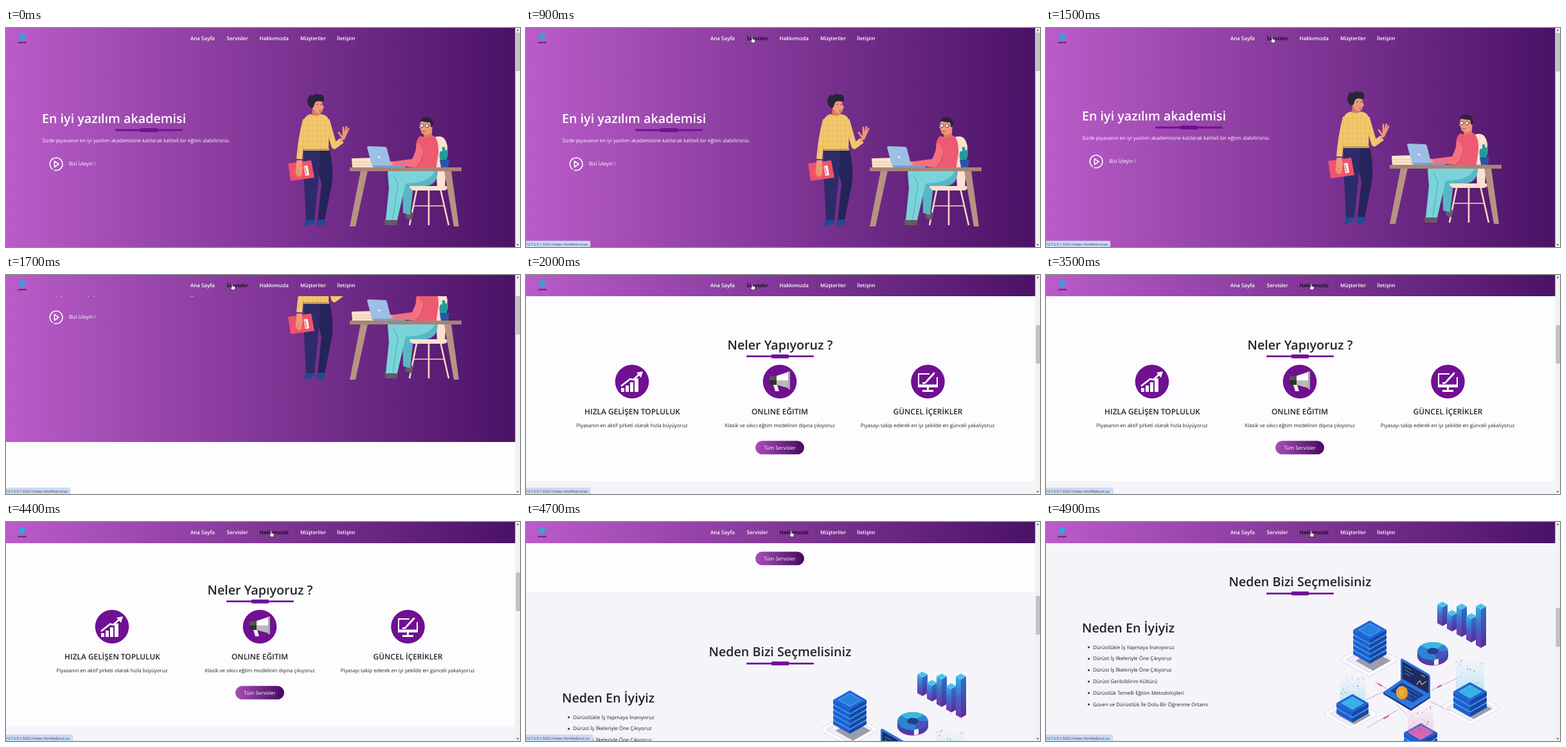
Recreate the animation shown at these times as an HTML page. Size 800x341 px, loop 5300 ms.

```html
<!DOCTYPE html>
<html lang="tr">
<head>
<meta charset="utf-8">
<title>Yazılım akademisi</title>
<style>
html, body { margin: 0; width: 100%; height: 100%; overflow: hidden; background: #fdfcff; }
svg { display: block; width: 800px; height: 341px; }
text { font: 400 7.88px "Open Sans", "Noto Sans", sans-serif; fill: #212529; text-rendering: geometricPrecision; }
.h1 { font-size: 19.7px; font-weight: 600; }
.h4 { font-size: 11.9px; font-weight: 600; }
.mid { text-anchor: middle; }
.light { fill: #fff; }
.nav text { font-size: 8px; font-weight: 600; fill: #fff; }
.nav text.hover { fill: #0c0512; }
.nav .logo { font-size: 4px; font-weight: 700; fill: #1d0f2c; }
.status { font-size: 5.85px; fill: #3c4043; }
.bar { fill: #701092; }
</style>
</head>
<body>
<svg viewBox="0 0 800 341">
  <defs>
    <linearGradient id="purple">
      <stop offset="0" stop-color="#ba5cc9"/><stop offset="1" stop-color="#4a1266"/>
    </linearGradient>
    <linearGradient id="pill">
      <stop offset="0" stop-color="#a94eb8"/><stop offset="1" stop-color="#430a5e"/>
    </linearGradient>
    <linearGradient id="column" x2="0" y2="1">
      <stop offset="0" stop-color="#35b0e6"/><stop offset=".5" stop-color="#4467c8"/><stop offset="1" stop-color="#7a2fa8"/>
    </linearGradient>
    <linearGradient id="columnShade" x2="0" y2="1">
      <stop offset="0" stop-color="#2b72cc"/><stop offset="1" stop-color="#5b2a98"/>
    </linearGradient>
    <linearGradient id="cyanBeam" x2="0" y2="1">
      <stop offset="0" stop-color="#8fdcf0" stop-opacity="0"/><stop offset="1" stop-color="#6bcdec" stop-opacity=".5"/>
    </linearGradient>
    <linearGradient id="pinkBeam" x2="0" y2="1">
      <stop offset="0" stop-color="#f0a3c4" stop-opacity="0"/><stop offset="1" stop-color="#e98fb5" stop-opacity=".5"/>
    </linearGradient>
    <pattern id="check" width="7" height="8" patternUnits="userSpaceOnUse">
      <path d="M0 0H7M0 0V8" stroke="#cf9440" stroke-width=".9" fill="none"/>
    </pattern>
    <g id="rule" class="bar"><rect x="-52.5" y="-1.4" width="105" height="2.8" rx="1"/><rect x="-13.5" y="-3" width="27" height="6" rx="1"/></g>
  </defs>

  <g id="page">
    <rect width="793" height="406" fill="url(#purple)"/>
    <rect y="406" width="793" height="321" fill="#fdfcff"/>
    <rect y="727" width="793" height="400" fill="#f5f4f9"/>

    <g id="hero">
      <text class="h1 light" x="56" y="148">En iyi yazılım akademisi</text>
      <use href="#rule" x="222.5" y="159"/>
      <text class="light" x="56.5" y="177.5">Sizde piyasanın en iyi yazılım akademisine katılarak kaliteli bir eğtim alabilirsiniz.</text>
      <g fill="none" stroke="#fff" stroke-width="1.6" stroke-linejoin="round" stroke-linecap="round">
        <path d="M72.3 219.8A9.8 9.8 0 1 1 75.6 221.4"/>
        <path d="M75.5 207.3V216.7L82 212z"/>
      </g>
      <text class="light" x="98" y="214">Bizi İzleyin !</text>

      <g id="standing">
        <path d="M478 190H504Q511 222 507 244L496 299H485L491 243z" fill="#24245a"/>
        <path d="M463 190H489Q488 225 485 250L480 300H467L464 240z" fill="#2d2c68"/>
        <path d="M466 299H480L479 304 468 309H464zM485 298H495L497 306Q491 310 483 307z" fill="#214b91"/>
        <path d="M463 187H503V191H463z" fill="#c99a55"/>
        <path d="M477 124H489V138Q482 142 476 137z" fill="#d77d60"/>
        <path d="M474 134Q482 139 490 134Q501 135 503 146L502 188H463Q462 165 462 149Q463 137 474 134z" fill="#f3c76c"/>
        <path d="M466.500 143Q459 172 456.500 204M499 143Q506 168 511 184L523 175" fill="none" stroke="#f3c76c" stroke-width="9" stroke-linejoin="round"/>
        <path d="M474 134Q482 139 490 134Q501 135 507 163L502 188H463L453 203 460 149Q463 137 474 134z" fill="url(#check)" opacity=".5"/>
        <path d="M475 113Q484 109 492 114L493 120 495 124 493 126Q493 133 486 133Q477 130 475 113z" fill="#ee9a78"/>
        <path d="M473 123Q466 116 470 110Q471 103 478 105Q483 100 488 104Q495 103 495 109Q496 114 492 115Q485 112 481 116L479 122Q476 127 473 123z" fill="#28243a"/>
        <path d="M483 119h3M489 119h3M487 129h4" fill="none" stroke="#4d2c32" stroke-width=".8"/>
        <path d="M439 211L475 206 480 233 443 238z" fill="#f0526a"/>
        <path d="M463.500 215l6-1 2.500 15-6 1z" fill="#fff3ec"/>
        <path d="M465.500 217l2.500 11" stroke="#a8485e"/>
        <path d="M452.500 206h8l1 12-2 12-4 2-5-5z" fill="#ee9a78"/>
        <path d="M453 222l5 2M452 226l5 2" stroke="#b86354" stroke-width=".6"/>
        <path d="M521 177L526 167M525 173L518 163M525 170L525 155M526 170L530 154M526 172L533 157" fill="none" stroke="#ee9a78" stroke-width="2.800" stroke-linecap="round"/>
      </g>

      <g id="seated">
        <path d="M667 170Q684 164 687 185L683 249H671z" fill="#fbe1cf"/>
        <path d="M640 248L628 307M676 250L689 307M658 250V307" fill="none" stroke="#f3d6c5" stroke-width="2.600"/>
        <path d="M635 277H683" stroke="#f3d6c5" stroke-width="1.500"/>
        <path d="M589 298H610L608 307H590zM622 288L635 287 631 299 622 296z" fill="#665a66"/>
        <path d="M635 222H672Q672 246 650 246H634L629 291 618 288 617 233z" fill="#57b7c5"/>
        <path d="M594 224Q598 219 640 220L668 222Q660 241 622 242L609 299H591L596 250z" fill="#7bd3da"/>
        <path d="M603 229L610 243 602 298" fill="none" stroke="#3c98a9" stroke-width=".7"/>
        <path d="M628 246H686Q689 252 681 253H634Q628 251 628 246z" fill="#fbe1cf"/>
        <path d="M650 157h13v13l-7 4-6-4z" fill="#d77d60"/>
        <path d="M645 168Q655 173 664 167Q674 172 673 195L669 222H638L638 184Q639 171 645 168z" fill="#ee5a72"/>
        <path d="M641 178Q637 195 632 204L601 208V214L637 217Q646 213 651 194" fill="#f4707f"/>
        <path d="M651 190Q646 213 637 217" fill="none" stroke="#bd3852" stroke-width=".8"/>
        <path d="M602 208L590 207 585 212 590 214H602z" fill="#ee9a78"/>
        <path d="M645 146Q655 141 664 148L663 162Q656 169 647 164L645 157 643 155z" fill="#ee9a78"/>
        <path d="M644 147Q645 138 655 139Q665 139 665 152L662 155 660 147Q652 147 646 145z" fill="#28243a"/>
        <g fill="#f6dfe2" stroke="#3c304b" stroke-width=".8"><circle cx="647" cy="152" r="2.800"/><circle cx="655" cy="152" r="2.800"/></g>
        <path d="M658 152h4M648 161h5" stroke="#3c304b" stroke-width=".8"/>
        <path d="M676 205Q673 198 676 192H679V186Q683 182 684 191L688 188 688 198 685 206z" fill="#249b9c"/>
        <path d="M675 205h15l-2 12h-11z" fill="#2756a5"/>
        <path d="M538 203l37-1 2 7-1 8h-37z" fill="#fce5ca"/>
        <path d="M539 209h37M542 213h33" stroke="#d6b99f" stroke-width=".8"/>
        <path d="M562 186Q562 184 565 184L590 185Q592 185 593 188L600 216H570z" fill="#9dbfe4"/>
        <path d="M570 214h51v3h-49z" fill="#7c9fd0"/>
        <circle cx="581" cy="201" r="1.800" fill="#e8f1ff"/>
        <path d="M552 222h11L544 309h-9zM682 222h11L705 309h-8z" fill="#b89382"/>
        <path d="M535 217h174v6H535z" fill="#a78377"/>
      </g>
    </g>

    <g id="services" transform="translate(0 406)">
      <text class="h1 mid" x="395.500" y="115.500">Neler Yapıyoruz ?</text>
      <use href="#rule" x="395.500" y="126.700"/>
      <g class="bar"><circle cx="165" cy="166" r="26.300"/><circle cx="395" cy="166" r="26.300"/><circle cx="625.500" cy="166" r="26.300"/></g>
      <g fill="#fff">
        <path d="M148 176h5v6h-5zM155 172h5v10h-5zM162 167h5v15h-5zM169 161h6v21h-6z"/>
        <path d="M148 173L162 162 167 163 177 154" fill="none" stroke="#fff" stroke-width="2.800"/>
        <path d="M172 152l10-2-3 10z"/>
      </g>
      <g>
        <path d="M379 158L390 157V171H379z" fill="#555"/>
        <path d="M390 157L408 151V164H390z" fill="#fff"/><path d="M390 164H408V176L390 171z" fill="#bbb"/>
        <path d="M379 164h11v7h-11z" fill="#303030"/>
        <path d="M385 171h6l3 10h-6z" fill="#eee"/>
        <path d="M408 150h3v28h-3z" fill="#a6a6a6"/>
      </g>
      <g fill="none" stroke="#fff" stroke-width="2">
        <path d="M628 154H611V174H640V159"/>
        <path d="M611 172H640" stroke-width="3"/>
        <path d="M625.500 174V180M617 180.500H634" stroke-width="3"/>
        <path d="M624 165L635 153" stroke-width="3" stroke-linecap="round"/>
        <path d="M617 168Q622 169 623 166" stroke-width="2.500"/>
      </g>
      <text class="h4 mid" x="165.500" y="217.300">HIZLA GELİŞEN TOPLULUK</text>
      <text class="h4 mid" x="395" y="217.300">ONLINE EĞITIM</text>
      <text class="h4 mid" x="625.500" y="217.300">GÜNCEL İÇERİKLER</text>
      <text class="mid" x="165" y="236.500">Piyasanın en aktif şirketi olarak hızla büyüyoruz</text>
      <text class="mid" x="395" y="236.500">Klasik ve sıkıcı eğtim modelinin dışına çıkıyoruz</text>
      <text class="mid" x="625" y="236.500">Piyasayı takip ederek en iyi şekilde en günceli yakalıyoruz</text>
      <rect x="357" y="258.300" width="76" height="21" rx="10.500" fill="url(#pill)"/>
      <text class="mid light" x="395" y="271.700">Tüm Servisler</text>
    </g>

    <g id="about" transform="translate(0 727)">
      <text class="h1 mid" x="395.500" y="100">Neden Bizi Seçmelisiniz</text>
      <use href="#rule" x="395.500" y="111.300"/>
      <text class="h1" x="56" y="172">Neden En İyiyiz</text>
      <g id="list"></g>
      <g id="iso"></g>
    </g>
  </g>

  <g class="nav">
    <rect width="793" height="33" fill="url(#purple)"/>
    <circle cx="25" cy="13" r="5.500" fill="#3f9bdc"/>
    <text class="logo mid" x="25" y="23.500">nolvek</text>
    <g id="links"></g>
  </g>

  <rect x="792.500" width="7.500" height="341" fill="#f1f1f1"/>
  <path d="M794.500 4.500h4l-2-2.500zM794.500 336.500h4l-2 2.500z" fill="#555"/>
  <rect id="thumb" x="793.500" y="7" width="6.500" height="60" fill="#c1c1c1"/>

  <g id="status">
    <path id="statusBox" fill="#cbdcf7" stroke="#b3c5e4" stroke-width=".5"/>
    <text id="statusText" class="status" x="0" y="339"></text>
  </g>

  <g id="cursor" stroke="#111" stroke-width=".6" stroke-linejoin="round" fill="#fff">
    <path id="arrow" d="M0 0V10L2.300 7.900 4 11.600 5.600 10.900 4 7.300H7.200z"/>
    <path id="hand" d="M-.9 .6Q0-.7 .9 .6V4L4 4.800Q5 5.100 4.700 6.500L4 9.800H-.4L-2.700 6.400Q-2.500 5-.9 6.200z"/>
  </g>
</svg>

<script>
const $ = id => document.getElementById(id);
const shape = (points, fill, extra = '') => `<path d="M${points}z" fill="${fill}" ${extra}/>`;

// ---- page content ----
const links = [
  ['Ana Sayfa', 287, 325],
  ['Servisler', 343.5, 376],
  ['Hakkımızda', 394.5, 439],
  ['Müşteriler', 458, 497],
  ['İletişim', 515, 543],
];
$('links').innerHTML = links.map(([label, x]) => `<text x="${x}" y="18.800">${label}</text>`).join('');
const linkNodes = [...$('links').children];

$('list').innerHTML = [
  'Dürüstlükle İş Yapmaya İnanıyoruz',
  'Dürüst İş İlkeleriyle Öne Çıkıyoruz',
  'Dürüst İş İlkeleriyle Öne Çıkıyoruz',
  'Dürüst Geribildirim Kültürü',
  'Dürüstlük Temelli Eğitim Metodolojileri',
  'Güven ve Dürüstlük İle Dolu Bir Öğrenme Ortamı',
].map((line, i) => {
  const y = 194.8 + i * 17.8;
  return `<circle cx="66.500" cy="${y + .3}" r="1.500" fill="#212529"/><text x="73" y="${y + 2.8}">${line}</text>`;
}).join('');

// ---- isometric drawing ----
const rhomb = (x, y, w, h) => `${x - w} ${y}L${x} ${y - h} ${x + w} ${y} ${x} ${y + h}`;

function block(x, y, w, depth, top, left, right) {
  const h = w * .57;
  return shape(`${x - w} ${y}L${x} ${y + h}V${y + h + depth}L${x - w} ${y + depth}`, left)
    + shape(`${x + w} ${y}L${x} ${y + h}V${y + h + depth}L${x + w} ${y + depth}`, right)
    + shape(rhomb(x, y, w, h), top);
}

function platform(x, y, w) {
  const ring = (size, fill, width) =>
    shape(rhomb(x, y, size, size * .56), fill, `stroke="${fill}" stroke-width="${width}" stroke-linejoin="round"`);
  return ring(w - 5, '#d6d4e0', 9) + ring(w - 5, '#fbfaff', 7.5) + ring(w - 11, '#d6d4e0', 4)
    + ring(w - 11, '#efedf6', 2.5) + shape(rhomb(x + 6, y + 2, w * .62, w * .35), '#9d9cab');
}

function stack(x, y, w, layers, step, cap, glow) {
  let out = '';
  for (let i = layers - 1; i >= 0; i--)
    out += block(x, y + i * step, w, step - 2, i ? '#3a94e6' : cap, '#1d5fd0', '#1846a8');
  return out + shape(rhomb(x, y, w * .68, w * .39), glow, 'stroke="#6cc7f4" stroke-width=".7"');
}

let seed = 7;
const rand = () => (seed = seed * 16807 % 2147483647) / 2147483647;

function beam(x, y, w, height, fill, dot) {
  let out = shape(`${x - w} ${y - height}H${x + w}V${y}L${x} ${y + w * .57} ${x - w} ${y}`, `url(#${fill})`);
  for (let i = 0; i < 22; i++) {
    const size = .5 + rand() * 1.1;
    out += `<rect x="${x - w + rand() * 2 * w}" y="${y - rand() * height}" width="${size}" height="${size * 1.8}" fill="${dot}" opacity=".7"/>`;
  }
  return out;
}

const column = (x, top, bottom, w) =>
  block(x, top + w * .57, w, bottom - top - w * 1.14, '#4cc3ea', 'url(#column)', 'url(#columnShade)');
const columns = [124, 137, 127, 142, 127].map((top, i) => column(617 + i * 15, top, 162 + i * 8.5, 8)).join('');

const wires = `<path d="M512 249L534 262M498 277L530 262M600 262L640 243M597 279L628 294M545 284L562 300M500 320L548 292"
  fill="none" stroke="#c9a5cb"/>
  <path d="M526 306L533 302M517 252L522 255M610 257L615 254.500" stroke="#cf3f9c" stroke-width="2" stroke-linecap="round"/>`;

const pie = `<path d="M578 201V209A24 14.500 0 0 0 626 209V201z" fill="#6f2fa3"/>
  <path d="M578 201V205A24 14.500 0 0 0 626 205V201z" fill="#2c4fb4"/>
  <ellipse cx="602" cy="201" rx="24" ry="14" fill="#2f83d0"/>
  <path d="M602 201L583 192.500A24 14 0 0 1 619 191z" fill="#3cb7e0"/>
  <path d="M602 201L626 201A24 14 0 0 1 609 214.500z" fill="#4d4fc0"/>
  <ellipse cx="602" cy="201" rx="9" ry="5" fill="#1f3f8f"/>
  <path d="M604 215V223L611 222V213z" fill="#f5f4f9"/>`;

const laptop = shape('525 265L568 290 598 271V274L568 294 525 268', '#173a8d')
  + shape('525 265L552 246 598 271 568 290', '#2d77dc')
  + shape('536 263L554 250 588 269 571 281', '#183d94')
  + '<path d="M543 261L572 277M548 257L578 274M553 254L583 270" stroke="#4aa6ec" stroke-width=".8" stroke-dasharray="2 1"/>'
  + shape('552 216Q552 212 555 213L595 236Q598 238 598 241V272L552 247', '#2874dd')
  + shape('554.500 217L595.500 240V267L554.500 244', '#1f2a62')
  + '<path d="M558 225l10 5.500M558 230l14 8M558 235l8 4.500" stroke="#37a7d6"/>'
  + '<path d="M577 253l5-6 3 6 7-5M584 238l6 3" fill="none" stroke="#e0b35d" stroke-width="1.200"/>'
  + '<ellipse cx="555" cy="266.500" rx="9" ry="10.500" fill="#bd741d"/><ellipse cx="553.500" cy="265.500" rx="8.500" ry="10" fill="#f2ae38"/>'
  + '<ellipse cx="553.500" cy="265.500" rx="5.500" ry="7" fill="none" stroke="#c98425"/>';

$('iso').innerHTML = platform(503, 214, 44) + platform(474, 299, 41) + platform(660, 289, 45) + platform(585, 352, 44)
  + wires + stack(504, 168, 26, 5, 8, '#1f66d6', '#2b7fe2') + columns + pie + laptop
  + beam(477, 281, 20, 42, 'cyanBeam', '#38b5dc') + stack(477, 282, 25, 2, 9, '#1f66d6', '#36b2e6')
  + beam(660, 263, 22, 50, 'cyanBeam', '#38b5dc') + stack(660, 264, 26, 3, 9, '#1f66d6', '#36b2e6')
  + stack(583, 328, 26, 3, 9, '#3a4fc4', '#c845a5') + beam(583, 328, 20, 42, 'pinkBeam', '#d6409a');

// ---- motion ----
const LOOP = 5300, TICK = 100;
const SERVICES = 406, ABOUT = 727;
const scrollEase = [.01, .13, .36, .66, .9, 1];
const mix = (a, b, p) => a + (b - a) * p;

const glide = (t, start) => t < start ? 0 : scrollEase[Math.min(5, (t - start) / TICK)];
const scrollAt = t => SERVICES * glide(t, 1500) + (ABOUT - SERVICES) * glide(t, 4400);

function cursorAt(t) {
  if (t < 100) return null;
  if (t < 800) {
    const p = 1 - (1 - Math.min(1, (t - 100) / 500)) ** 2;
    return [mix(788, 484, p), mix(299, 6, p)];
  }
  if (t < 900) return [362, 13];
  if (t < 2900) return [352, 13.3];
  if (t < 3500) {
    const p = (t - 2800) / 600;
    return [mix(352, 481, p), mix(13.3, 21, p)];
  }
  return [412.5, 13.3];
}

const linkAt = pos => pos && pos[1] > 9 && pos[1] < 18 ? links.findIndex(([, a, b]) => pos[0] >= a && pos[0] <= b) : -1;
const statusAt = t => t < 900 ? '' : t < 3100 ? 'services' : 'about-us';

function draw(now) {
  const t = Math.floor(now % LOOP / TICK) * TICK;
  const scroll = scrollAt(t), pos = cursorAt(t), over = linkAt(pos), hash = statusAt(t);

  $('page').setAttribute('transform', `translate(0 ${-Math.round(scroll)})`);
  $('thumb').setAttribute('y', 7 + scroll * .175);
  linkNodes.forEach((node, i) => node.classList.toggle('hover', i === over));

  $('status').style.display = hash ? '' : 'none';
  $('statusText').textContent = '127.0.0.1:5501/index.html#' + hash;
  $('statusBox').setAttribute('d', `M-1 331.500H${hash === 'services' ? 98 : 102}q2 0 2 2V342H-1z`);

  $('cursor').style.display = pos ? '' : 'none';
  if (pos) $('cursor').setAttribute('transform', `translate(${pos})`);
  $('hand').style.display = over >= 0 ? '' : 'none';
  $('arrow').style.display = over >= 0 ? 'none' : '';
}

const origin = performance.now();
function loop() {
  draw(performance.now() - origin);
  requestAnimationFrame(loop);
}
loop();
</script>
</body>
</html>
```
